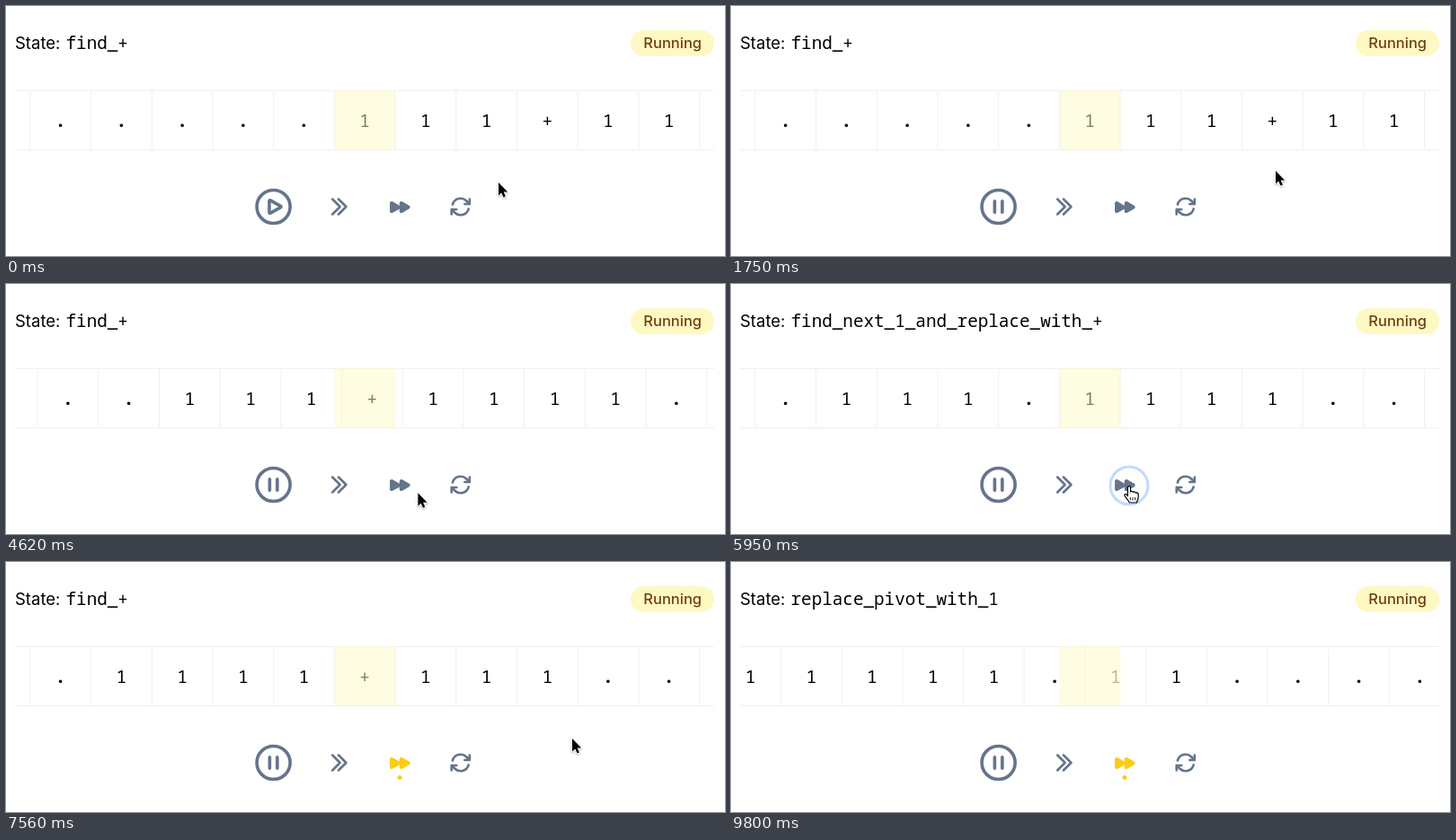
These frames come from a looping animation (800x279 px, 9.87 s). An HTML page with a canvas:

```html
<!DOCTYPE html>
<html lang="en">
<head>
<meta charset="utf-8">
<title>Unary addition machine</title>
<style>
  html, body { margin: 0; width: 100%; height: 100%; overflow: hidden; background: #fff; }
  canvas { display: block; width: 800px; height: 279px; }
</style>
</head>
<body>
<canvas id="stage"></canvas>
<script>
const LOOP = 9870, W = 800, H = 279;
const PITCH = 67.7, HEAD_X = 399.2;
const TAPE = { left: 10, right: 788, top: 94.5, bottom: 160.5 };
const SLATE = '#64748b', YELLOW = '#facc15';
const SANS = 'Inter, sans-serif', MONO = '"Noto Sans Mono", "DejaVu Sans Mono", monospace';
const PLAY_AT = 1110, FAST_AT = 6014;
const CLICKS = [[1100, 1200], [5900, 6030]];
const FADE = 250, CURSOR_END = 8220;

const canvas = document.getElementById('stage');
const ctx = canvas.getContext('2d');
const dpr = window.devicePixelRatio || 1;
canvas.width = W * dpr;
canvas.height = H * dpr;

const ICONS = {
  circle: new Path2D('M21 12a9 9 0 1 1-18 0 9 9 0 0 1 18 0z'),
  play: new Path2D('M15.91 11.672a.375.375 0 0 1 0 .656l-5.603 3.113a.375.375 0 0 1-.557-.328V8.887c0-.286.307-.466.557-.327l5.603 3.112z'),
  pause: new Path2D('M14.05 9v6M9.95 15V9'),
  step: new Path2D('M5.25 4.5l7.5 7.5-7.5 7.5m6-15l7.5 7.5-7.5 7.5'),
  forward: new Path2D('M5.055 7.06C3.805 6.347 2.25 7.25 2.25 8.69v8.122c0 1.44 1.555 2.343 2.805 1.628L12 14.471v2.34c0 1.44 1.555 2.343 2.805 1.628l7.108-4.061c1.26-.72 1.26-2.536 0-3.256l-7.108-4.061C13.555 6.346 12 7.249 12 8.689v2.34L5.055 7.061Z'),
  reset: new Path2D('M16.023 9.348h4.992M2.985 19.644v-4.992h4.992m-4.993 0l3.181 3.183a8.25 8.25 0 0 0 13.803-3.7M4.031 9.865a8.25 8.25 0 0 1 13.803-3.7l3.181 3.182m0-4.991v4.99')
};
const ARROW = new Path2D('M0 0v14.6l3.3-3.1 2.2 5 2.4-1-2.2-4.9h4.5z');
const HAND = new Path2D('M-1.6 1.2C-1.6-1 1.4-1 1.5 1.2V6c.6-1.2 2.9-1 3 .5.8-1 2.8-.7 2.9.8 1-.8 2.8-.2 2.8 1.5v3.5c0 2.2-1.5 3.2-1.7 5.7H.2c-.3-2-3.2-4.6-5-7.3C-6 9-4 7.6-2.7 9.2l1.1 1.3z');
const KNUCKLES = new Path2D('M1.3 12v3.4M4 12v3.4M6.7 12v3.4');

// Pointer stops: time, x, y
const POINTER = [
  [0, 548, 197], [70, 548, 197], [880, 298, 224], [1110, 298, 224],
  [1740, 606, 184], [2990, 606, 184], [3490, 530, 239], [3960, 494, 254],
  [4130, 452, 214], [4250, 452, 214], [4960, 464, 250], [5300, 464, 250],
  [5740, 443, 226], [6150, 443, 226], [6850, 630, 197]
];

// symbol read -> [symbol written, move, next state]
const RULES = {
  'find_+': { '1': ['1', 1, 'find_+'], '+': ['.', 1, 'find_next_1_and_replace_with_+'] },
  'find_next_1_and_replace_with_+': { '1': ['+', -1, 'replace_pivot_with_1'] },
  'replace_pivot_with_1': { '.': ['1', 1, 'find_+'] }
};

const stepTime = k => k < 4 ? 2130 + 1050 * k : 6539 + 525 * (k - 4);

function runMachine() {
  const tape = [...'111+1111'];
  const list = [{ at: -LOOP, head: 0, from: 0, state: 'find_+', tape: tape.slice(), slide: 1 }];
  let head = 0, state = 'find_+';
  for (let k = 0; stepTime(k) < LOOP; k++) {
    const old = tape[head], from = head;
    const [write, move, next] = RULES[state][old];
    tape[head] = write;
    head += move;
    state = next;
    list.push({ at: stepTime(k), head, from, state, old, tape: tape.slice(), slide: k < 4 ? 500 : 250 });
  }
  return list;
}
const steps = runMachine();

const clamp = v => Math.max(0, Math.min(1, v));
const smooth = v => v * v * (3 - 2 * v);

function text(str, x, y, size, font, color, align = 'left', weight = 400) {
  ctx.font = `${weight} ${size}px ${font}`;
  ctx.fillStyle = color;
  ctx.textAlign = align;
  ctx.fillText(str, x, y);
}

function line(x1, y1, x2, y2) {
  ctx.beginPath();
  ctx.moveTo(x1, y1);
  ctx.lineTo(x2, y2);
  ctx.stroke();
}

function icon(paths, x, y, scale, color, width) {
  ctx.save();
  ctx.translate(x, y);
  ctx.scale(scale, scale);
  ctx.translate(-12, -12);
  ctx.lineCap = ctx.lineJoin = 'round';
  ctx.lineWidth = width;
  ctx.strokeStyle = ctx.fillStyle = color;
  for (const p of paths) width ? ctx.stroke(p) : ctx.fill(p);
  ctx.restore();
}

function drawHeader(state) {
  text('State:', 10, 48, 18.5, SANS, '#000');
  text(state, 66.5, 48, 19.3, MONO, '#000');
  ctx.fillStyle = '#fef9c3';
  ctx.beginPath();
  ctx.roundRect(695, 27, 93, 29, 14.5);
  ctx.fill();
  text('Running', 741.7, 47.3, 16.5, SANS, '#713f12', 'center', 500);
}

function drawSymbol(sym, x, alpha) {
  ctx.globalAlpha = alpha;
  text(sym, x, 135, 19.6, MONO, '#000', 'center', sym === '.' ? 700 : 400);
  ctx.globalAlpha = 1;
}

function drawTape(step, t) {
  const age = t - step.at;
  const pos = step.from + (step.head - step.from) * smooth(clamp(age / step.slide));
  const { left, right, top, bottom } = TAPE;
  ctx.save();
  ctx.beginPath();
  ctx.rect(left, top - 1, right - left, bottom - top + 2);
  ctx.clip();
  ctx.strokeStyle = '#f0f0f0';
  ctx.lineWidth = 1;
  line(left, top, right, top);
  line(left, bottom, right, bottom);
  for (let i = Math.floor(pos) - 7; i <= pos + 7; i++) {
    const x = HEAD_X + (i - pos) * PITCH;
    line(x + PITCH / 2, top, x + PITCH / 2, bottom);
    const sym = step.tape[i] || '.';
    const changed = step.old && i === step.from && step.old !== sym;
    if (!changed) drawSymbol(sym, x, 1);
    else if (age < FADE) drawSymbol(step.old, x, 1 - age / FADE);
    else drawSymbol(sym, x, clamp(age / FADE - 1));
  }
  ctx.restore();
  ctx.fillStyle = 'rgba(254, 249, 195, .5)';
  ctx.fillRect(365.5, 94, 68, 67);
}

function drawControls(t) {
  const fast = t >= FAST_AT;
  icon([ICONS.circle, t < PLAY_AT ? ICONS.play : ICONS.pause], 297.6, 224, 2.06, SLATE, 1.75);
  icon([ICONS.step], 370.8, 224, 1.13, SLATE, 2.3);
  icon([ICONS.forward], 437.8, 223.7, 1.1, fast ? YELLOW : SLATE, 0);
  icon([ICONS.reset], 505.8, 224, 1.12, SLATE, 2.3);
  if (fast) {
    ctx.fillStyle = YELLOW;
    ctx.beginPath();
    ctx.arc(438, 240.6, 2.5, 0, 7);
    ctx.fill();
  }
}

function pointerAt(t) {
  const n = POINTER.findIndex(p => p[0] > t);
  if (n < 0) return POINTER[POINTER.length - 1].slice(1);
  const [t0, x0, y0] = POINTER[n - 1], [t1, x1, y1] = POINTER[n];
  const k = smooth((t - t0) / (t1 - t0));
  return [x0 + (x1 - x0) * k, y0 + (y1 - y0) * k];
}

function drawPointer(t) {
  if (t >= CURSOR_END) return;
  const [x, y] = pointerAt(t);
  const over = [[298, 20], [371, 14], [438, 14], [506, 14]]
    .some(([bx, r]) => Math.hypot(x - bx, y - 224) < r);
  ctx.save();
  ctx.translate(x, y);
  if (CLICKS.some(([a, b]) => t >= a && t < b)) {
    ctx.strokeStyle = '#bfdbfe';
    ctx.lineWidth = 3;
    ctx.beginPath();
    ctx.arc(0, -1, 21, 0, 7);
    ctx.stroke();
  }
  ctx.lineJoin = 'round';
  ctx.lineWidth = 1.2;
  if (over) {
    ctx.fillStyle = '#fff';
    ctx.strokeStyle = '#000';
    ctx.fill(HAND);
    ctx.stroke(HAND);
    ctx.lineWidth = 0.9;
    ctx.stroke(KNUCKLES);
  } else {
    ctx.shadowColor = 'rgba(0, 0, 0, .3)';
    ctx.shadowBlur = 2 * dpr;
    ctx.shadowOffsetY = dpr;
    ctx.lineWidth = 2;
    ctx.strokeStyle = '#fff';
    ctx.stroke(ARROW);
    ctx.shadowColor = 'transparent';
    ctx.fillStyle = '#000';
    ctx.fill(ARROW);
  }
  ctx.restore();
}

function draw(t) {
  ctx.setTransform(dpr, 0, 0, dpr, 0, 0);
  ctx.fillStyle = '#fff';
  ctx.fillRect(0, 0, W, H);
  const step = steps.filter(s => s.at <= t).pop();
  drawHeader(step.state);
  drawTape(step, t);
  drawControls(t);
  drawPointer(t);
}

const start = performance.now();
function tick() {
  draw((performance.now() - start) % LOOP);
  requestAnimationFrame(tick);
}
tick();
</script>
</body>
</html>
```
